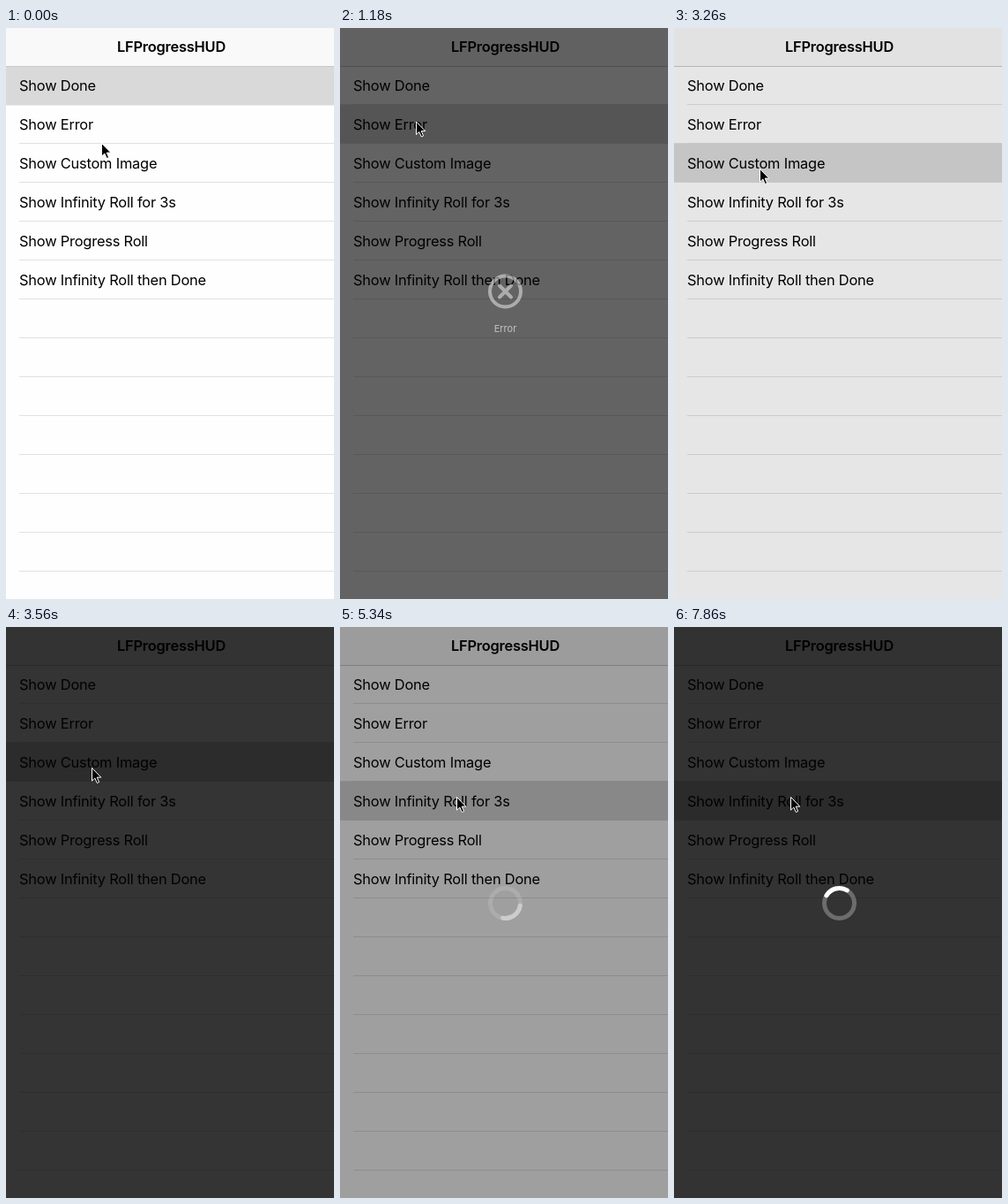
An HTML page that plays this animation: 372 by 646 pixels, repeating every 8000 ms.

```html
<!DOCTYPE html>
<html lang="en">
<head>
<meta charset="utf-8">
<title>LFProgressHUD</title>
<style>
  html, body { margin: 0; width: 100%; height: 100%; overflow: hidden; background: #fff; }
  svg { display: block; width: 372px; height: 646px; }
  text { font: 16.4px Inter, Roboto, sans-serif; letter-spacing: -0.2px; }
  .title { font-weight: 600; text-anchor: middle; }
  .label { font-size: 11px; letter-spacing: 0; text-anchor: middle; fill: #fff; opacity: .8; }
  .ring { fill: none; stroke: #fff; }
</style>
</head>
<body>
<svg viewBox="0 0 372 646">
  <rect width="372" height="646" fill="#fefefe"/>
  <g id="lines" fill="#e1e1e2"></g>
  <rect id="selected" width="372" height="44.5" fill="#d9d9d9"/>
  <g id="rows"></g>
  <rect width="372" height="43" fill="#f9f9f9"/>
  <rect y="43" width="372" height="1" fill="#c9c9c9"/>
  <text class="title" x="187.5" y="27">LFProgressHUD</text>

  <rect id="shade" width="372" height="646"/>
  <g id="error">
    <g class="ring" stroke-width="4" opacity=".62">
      <circle cx="187.5" cy="298" r="17.5"/>
      <path d="M181 291.5l13 13m0-13l-13 13" stroke-linecap="round"/>
    </g>
    <text class="label" x="187.5" y="344">Error</text>
  </g>
  <g id="spinner" class="ring" stroke-width="5">
    <circle cx="187.5" cy="312.5" r="17" opacity=".28"/>
    <circle id="arc" cx="187.5" cy="312.5" r="17" pathLength="360" stroke-dasharray="90 270" stroke-linecap="round"/>
  </g>
  <path id="cursor" d="M0 0V14.6L3.3 11.5L5.8 17L8.1 16L5.7 10.6H10.3Z" stroke="#fff" stroke-linejoin="round"/>
</svg>
<script>
const $ = id => document.getElementById(id);
const LOOP = 8000, TICKS = 54, TICK = LOOP / TICKS;
const FADE = 2.7;  // length of a fade, in ticks

const names = ['Show Done', 'Show Error', 'Show Custom Image', 'Show Infinity Roll for 3s',
  'Show Progress Roll', 'Show Infinity Roll then Done'];
$('rows').innerHTML = names.map((s, i) => `<text x="15" y="${71 + 44 * i}">${s}</text>`).join('');
$('lines').innerHTML = Array.from({length: 13}, (_, i) =>
  `<rect x="15" y="${86 + 44 * i}" width="357" height="1"/>`).join('');

// Pointer tip: tick, x, y
const path = [
  [0, 108.5, 130.5], [3, 86.5, 106], [11, 86.5, 106], [14, 92.5, 108.5], [17, 97.5, 161],
  [18, 97.5, 161], [19, 97.5, 159.5], [28, 97.5, 159.5], [30, 97, 186.5], [33, 132.5, 192.5], [54, 132.5, 192.5]
];

const clamp = v => Math.min(1, Math.max(0, v));
const ease = (n, start, length = FADE) => {
  const p = clamp((n - start) / length);
  return p * p * (3 - 2 * p);
};

function pointer(n) {
  const i = path.findIndex(p => p[0] > n);
  const [t0, x0, y0] = path[i - 1], [t1, x1, y1] = path[i];
  const p = (n - t0) / (t1 - t0);
  return [x0 + (x1 - x0) * p, y0 + (y1 - y0) * p];
}

function draw(n) {
  const error = ease(n, 6.16) - ease(n, 12.43);
  const custom = ease(n, 21.42) - ease(n, 28, 2);
  const roll = ease(n, 34.7);
  const row = [6, 21, 35].filter(t => n >= t).length;

  $('selected').setAttribute('y', row ? 42 + 44 * row + 0.3 : 43);
  $('shade').setAttribute('opacity', 0.8 * (error + custom + roll));
  $('error').setAttribute('opacity', error);
  $('spinner').setAttribute('opacity', roll);
  $('arc').setAttribute('transform', `rotate(${211 - 30.5 * (n - 53)} 187.5 312.5)`);
  $('cursor').setAttribute('transform', `translate(${pointer(n)})`);
}

const begin = performance.now();
function loop() {
  const time = (performance.now() - begin) % LOOP;
  draw(Math.floor((time + 5) / TICK) % TICKS);
  requestAnimationFrame(loop);
}
loop();
</script>
</body>
</html>
```
